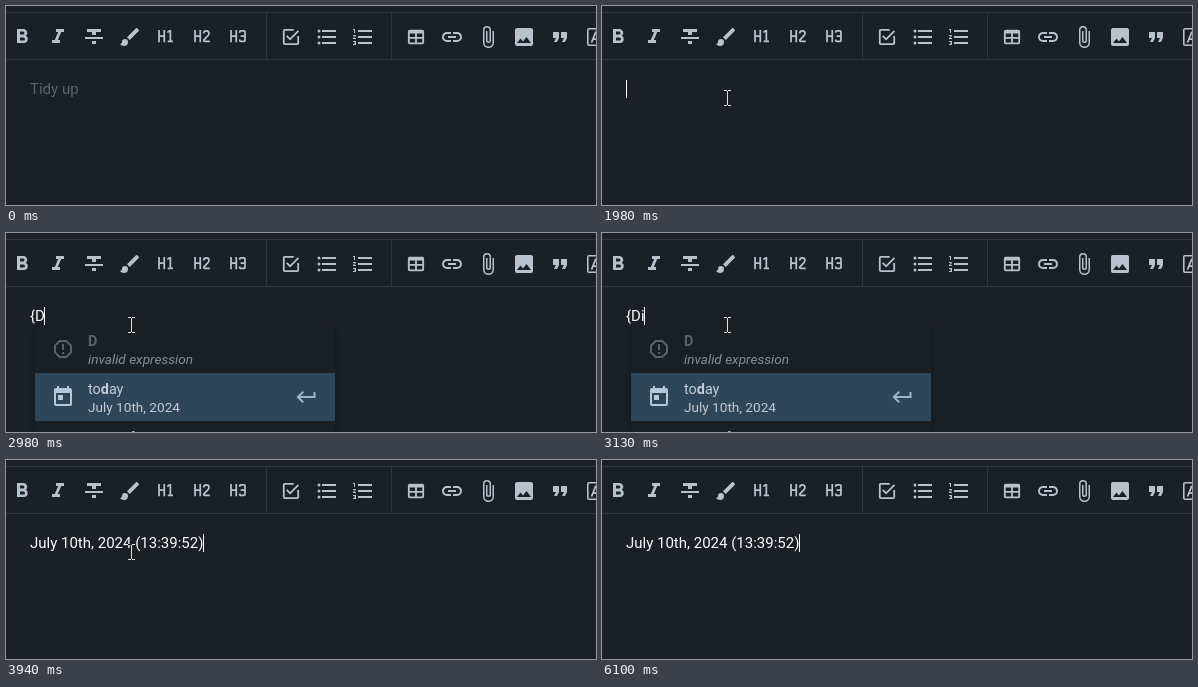
An HTML page with a canvas that plays this animation: 590 by 199 pixels, repeating every 6180 ms.

```html
<!DOCTYPE html>
<html lang="en">
<head>
<meta charset="utf-8">
<title>Date snippets in an editor</title>
<style>
  html, body { margin: 0; width: 100%; height: 100%; overflow: hidden; background: #1a2025; }
  canvas { display: block; }
</style>
</head>
<body>
<canvas id="stage" width="590" height="199"></canvas>
<script>
const ctx = document.getElementById('stage').getContext('2d');
const W = 590, H = 199, LOOP = 6180, BLINK = 535;
const FONT = 'Roboto, Arial, sans-serif';
const C = {
  bg: '#1a2025', line: '#30363c', icon: '#b8c2cd', text: '#fafbfc', hint: '#5d646b',
  popup: '#1a1f24', active: '#2e465a', title: '#c3cbd4', muted: '#59616a', note: '#858d96',
  accent: '#9bb6cb', track: '#2b2e32', thumb: '#8b95a1'
};

// Icons on a 24 x 24 grid
const HEAD = 'M3,4H5V10H9V4H11V18H9V12H5V18H3V4';
const ICONS = {
  bold: 'M13.5,15.5H10V12.5H13.5A1.5,1.5 0 0,1 15,14A1.5,1.5 0 0,1 13.5,15.5M10,6.5H13A1.5,1.5 0 0,1 14.5,8A1.5,1.5 0 0,1 13,9.5H10M15.6,10.79C16.57,10.11 17.25,9 17.25,8C17.25,5.74 15.5,4 13.25,4H7V18H14.04C16.14,18 17.75,16.3 17.75,14.21C17.75,12.69 16.89,11.39 15.6,10.79Z',
  italic: 'M10,4V7H12.21L8.79,15H6V18H14V15H11.79L15.21,7H18V4H10Z',
  strike: 'M3,14H21V12H3M5,4V7H10V10H14V7H19V4M10,19H14V16H10V19Z',
  brush: 'M20.71,4.63L19.37,3.29C19,2.9 18.35,2.9 17.96,3.29L9,12.25L11.75,15L20.71,6.04C21.1,5.65 21.1,5 20.71,4.63M7,14A3,3 0 0,0 4,17C4,18.31 2.84,19 2,19C2.92,20.22 4.5,21 6,21A4,4 0 0,0 10,17A3,3 0 0,0 7,14Z',
  h1: HEAD + 'M14,18V16H16V6.31L13.5,7.75V5.44L16,4H18V16H20V18H14Z',
  h2: HEAD + 'M21,18H15A2,2 0 0,1 13,16C13,15.47 13.2,15 13.54,14.64L18.41,9.41C18.78,9.05 19,8.55 19,8A2,2 0 0,0 17,6A2,2 0 0,0 15,8H13A4,4 0 0,1 17,4A4,4 0 0,1 21,8C21,9.1 20.55,10.1 19.83,10.83L15,16H21V18Z',
  h3: HEAD + 'M15,4H19A2,2 0 0,1 21,6V16A2,2 0 0,1 19,18H15A2,2 0 0,1 13,16V15H15V16H19V12H15V10H19V6H15V7H13V6A2,2 0 0,1 15,4Z',
  check: 'M19,19H5V5H15V3H5C3.89,3 3,3.89 3,5V19A2,2 0 0,0 5,21H19A2,2 0 0,0 21,19V11H19M7.91,10.08L6.5,11.5L11,16L21,6L19.59,4.58L11,13.17L7.91,10.08Z',
  bullets: 'M7,5H21V7H7V5M7,13V11H21V13H7M7,19V17H21V19H7M4,4.5A1.5,1.5 0 0,1 4,7.5A1.5,1.5 0 0,1 4,4.5M4,10.5A1.5,1.5 0 0,1 4,13.5A1.5,1.5 0 0,1 4,10.5M4,16.5A1.5,1.5 0 0,1 4,19.5A1.5,1.5 0 0,1 4,16.5Z',
  numbers: 'M7,13V11H21V13H7M7,19V17H21V19H7M7,7V5H21V7H7M3,8V5H2V4H4V8H3M2,17V16H5V20H2V19H4V18.5H3V17.5H4V17H2M4.25,10A0.75,0.75 0 0,1 5,10.75C5,10.95 4.92,11.14 4.79,11.27L3.12,13H5V14H2V13.08L4,11H2V10H4.25Z',
  table: 'M5,4H19A2,2 0 0,1 21,6V18A2,2 0 0,1 19,20H5A2,2 0 0,1 3,18V6A2,2 0 0,1 5,4M5,8V12H11V8H5M13,8V12H19V8H13M5,14V18H11V14H5M13,14V18H19V14H13Z',
  link: 'M3.9,12C3.9,10.29 5.29,8.9 7,8.9H11V7H7A5,5 0 0,0 2,12A5,5 0 0,0 7,17H11V15.1H7C5.29,15.1 3.9,13.71 3.9,12M8,13H16V11H8V13M17,7H13V8.9H17C18.71,8.9 20.1,10.29 20.1,12C20.1,13.71 18.71,15.1 17,15.1H13V17H17A5,5 0 0,0 22,12A5,5 0 0,0 17,7Z',
  clip: 'M16.5,6V17.5A4,4 0 0,1 12.5,21.5A4,4 0 0,1 8.5,17.5V5A2.5,2.5 0 0,1 11,2.5A2.5,2.5 0 0,1 13.5,5V15.5A1,1 0 0,1 12.5,16.5A1,1 0 0,1 11.5,15.5V6H10V15.5A2.5,2.5 0 0,0 12.5,18A2.5,2.5 0 0,0 15,15.5V5A4,4 0 0,0 11,1A4,4 0 0,0 7,5V17.5A5.5,5.5 0 0,0 12.5,23A5.5,5.5 0 0,0 18,17.5V6H16.5Z',
  image: 'M8.5,13.5L11,16.5L14.5,12L19,18H5M21,19V5C21,3.89 20.1,3 19,3H5A2,2 0 0,0 3,5V19A2,2 0 0,0 5,21H19A2,2 0 0,0 21,19Z',
  quote: 'M14,17H17L19,13V7H13V13H16M6,17H9L11,13V7H5V13H8L6,17Z',
  letter: 'M3,5A2,2 0 0,1 5,3H19A2,2 0 0,1 21,5V19A2,2 0 0,1 19,21H5A2,2 0 0,1 3,19V5M4.6,4.6V19.4H19.4V4.6H4.6M11,6.5H13L17.4,17.5H15.4L14.5,15H9.5L8.6,17.5H6.6ZM12,8.7L10.2,13.3H13.8Z',
  today: 'M7,10H12V15H7M19,19H5V8H19M19,3H18V1H16V3H8V1H6V3H5C3.89,3 3,3.9 3,5V19A2,2 0 0,0 5,21H19A2,2 0 0,0 21,19V5A2,2 0 0,0 19,3Z',
  event: 'M19,19H5V8H19M16,1V3H8V1H6V3H5C3.89,3 3,3.89 3,5V19A2,2 0 0,0 5,21H19A2,2 0 0,0 21,19V5C21,3.89 20.1,3 19,3H18V1M17,12H12V17H17V12Z',
  alert: 'M8.27,3L3,8.27V15.73L8.27,21H15.73L21,15.73V8.27L15.73,3M9.1,5H14.9L19,9.1V14.9L14.9,19H9.1L5,14.9V9.1M11,15H13V17H11V15M11,7H13V13H11V7',
  update: 'M21,10.12H14.22L16.96,7.3C14.23,4.6 9.81,4.5 7.08,7.2C4.35,9.91 4.35,14.28 7.08,17C9.81,19.7 14.23,19.7 16.96,17C18.32,15.65 19,14.08 19,12.1H21C21,14.08 20.12,16.65 18.36,18.39C14.85,21.87 9.15,21.87 5.64,18.39C2.14,14.92 2.11,9.28 5.62,5.81C9.13,2.34 14.76,2.34 18.27,5.81L21,3V10.12M12.5,8V12.25L16,14.33L15.28,15.54L11,13V8H12.5Z',
  enter: 'M19,7V11H5.83L9.41,7.41L8,6L2,12L8,18L9.41,16.58L5.83,13H21V7H19Z'
};
const paths = {};
for (const name in ICONS) paths[name] = new Path2D(ICONS[name]);

const GROUPS = [
  [16, ['bold', 'italic', 'strike', 'brush', 'h1', 'h2', 'h3']],
  [285, ['check', 'bullets', 'numbers']],
  [410, ['table', 'link', 'clip', 'image', 'quote', 'letter']]
];
const SCALE = { h1: 0.87, h2: 0.87, h3: 0.87, check: 0.9, table: 0.9 };

// Editor states: start time, text, popup query, start of the caret's blink
const STATES = [
  { at: 0, text: null },
  { at: 890, text: '', blink: 905 },
  { at: 2050, text: '{', query: '', blink: 2045 },
  { at: 2980, text: '{D', query: 'D', blink: 2980 },
  { at: 3130, text: '{Di', query: 'D', blink: 3130 },
  { at: 3200, text: '{Di', query: 'Di', blink: 3130 },
  { at: 3340, text: '{Dig', query: 'Dig', blink: 3340 },
  { at: 3470, text: '{Digi', query: 'Digi', blink: 3470 },
  { at: 3940, text: 'July 10th, 2024 (13:39:52)', blink: 3953 }
];

const TODAY = { icon: 'today', title: 'today', note: 'July 10th, 2024' };
const TOMORROW = { icon: 'event', title: 'tomorrow', note: 'July 11th, 2024' };
const YESTERDAY = { icon: 'event', title: 'yesterday', note: 'July 9th, 2024' };
const STAMP = { icon: 'update', title: 'Timestamp: Digital' };

function rect(x, y, w, h, color) {
  ctx.fillStyle = color;
  ctx.fillRect(x, y, w, h);
}

function icon(name, x, y, color, scale = 1) {
  ctx.save();
  ctx.translate(x, y);
  ctx.scale(scale, scale);
  ctx.translate(-12, -12);
  ctx.fillStyle = color;
  ctx.fill(paths[name], 'evenodd');
  ctx.restore();
}

// Returns the x where the text ends
function write(str, x, y, size, color, style = '') {
  ctx.font = `${style} ${size}px ${FONT}`;
  ctx.fillStyle = color;
  ctx.fillText(str, x, y);
  return x + ctx.measureText(str).width;
}

function toolbar() {
  rect(0, 6, W, 1, C.line);
  rect(0, 53, W, 1, C.line);
  rect(260, 7, 1, 46, C.line);
  rect(385, 7, 1, 46, C.line);
  for (const [x, names] of GROUPS) {
    names.forEach((name, i) => icon(name, x + i * 36, 31, C.icon, SCALE[name]));
  }
}

function row(item, i, query, active, right) {
  const y = 92 + i * 48;
  const dim = item.icon === 'alert';
  if (active) rect(29, y, right - 29, 48, C.active);
  icon(item.icon, 57, y + 24, dim ? C.muted : active ? '#b4c8d8' : C.title);

  const base = y + (item.note ? 21 : 29);
  const color = dim ? C.muted : C.title;
  const hit = item.title.toLowerCase().indexOf(query.toLowerCase());
  const end = query ? hit + query.length : item.title.length;
  let x = write(item.title.slice(0, hit), 82, base, 14.4, color);
  x = write(item.title.slice(hit, end), x, base, 14.4, color, 'bold');
  write(item.title.slice(end), x, base, 14.4, color);
  if (item.note) write(item.note, 82, y + 39, 13.6, dim ? C.note : C.title, dim ? 'italic' : '');
  if (active) icon('enter', right - 28.5, y + 24, C.accent);
}

function scrollbar() {
  rect(312, 92, 17, H - 92, C.track);
  rect(314, 109, 13, H - 109, C.thumb);
  ctx.fillStyle = C.thumb;
  ctx.beginPath();
  ctx.moveTo(316.5, 103);
  ctx.lineTo(320.5, 98.5);
  ctx.lineTo(324.5, 103);
  ctx.fill();
}

function popup(query) {
  const invalid = { icon: 'alert', title: query, note: 'invalid expression' };
  const items = !query ? [TODAY, TOMORROW]
    : query === 'D' ? [invalid, TODAY, YESTERDAY] : [invalid, STAMP];
  const height = query.length > 1 ? 96 : 150;
  const right = query ? 329 : 312;

  ctx.save();
  ctx.beginPath();
  ctx.roundRect(29, 92, 300, height, 4);
  ctx.shadowColor = 'rgba(0,0,0,.35)';
  ctx.shadowBlur = 6;
  ctx.shadowOffsetY = 2;
  ctx.fillStyle = C.popup;
  ctx.fill();
  ctx.shadowColor = 'transparent';
  ctx.clip();
  items.forEach((item, i) => row(item, i, query, i === (query ? 1 : 0), right));
  if (!query) scrollbar();
  ctx.restore();
}

function editor(t) {
  const s = STATES.filter(state => state.at <= t).pop();
  if (s.text === null) {
    write('Tidy up', 24, 88, 15, C.hint);
    return;
  }
  const end = write(s.text, 24, 88, 15, C.text);
  if (s.query !== undefined) popup(s.query);
  if (Math.floor(Math.max(0, t - s.blink) / BLINK) % 2 === 0) {
    rect(Math.floor(end), 74, 1, 18, C.text);
  }
}

// The pointer moves in discrete ticks
function pointerAt(t) {
  if (t < 410 || t >= 5630) return null;
  if (t < 890) {
    const p = 1 - Math.floor((t - 410) / 68.5) / 7;
    return [125 + 22 * p * p, 92 + 86 * p * p];
  }
  if (t < 4690) return [125, 92];
  if (t < 5220) return [126, 91];
  const p = (Math.floor((t - 5220) / 68.3) + 1) / 7;
  return [126 + 24 * p * p, 91 + 117 * p * p];
}

function pointer(t) {
  const pos = pointerAt(t);
  if (!pos) return;
  const [x, y] = pos.map(Math.round);
  ctx.save();
  ctx.globalCompositeOperation = 'difference';
  for (const top of [y - 8, y + 7]) {
    rect(x - 3, top, 3, 1, '#fff');
    rect(x + 1, top, 3, 1, '#fff');
  }
  rect(x, y - 7, 1, 14, '#fff');
  ctx.restore();
}

function draw(t) {
  rect(0, 0, W, H, C.bg);
  toolbar();
  editor(t);
  pointer(t);
}

const start = performance.now();
function tick() {
  draw((performance.now() - start) % LOOP);
  requestAnimationFrame(tick);
}
tick();
</script>
</body>
</html>
```
